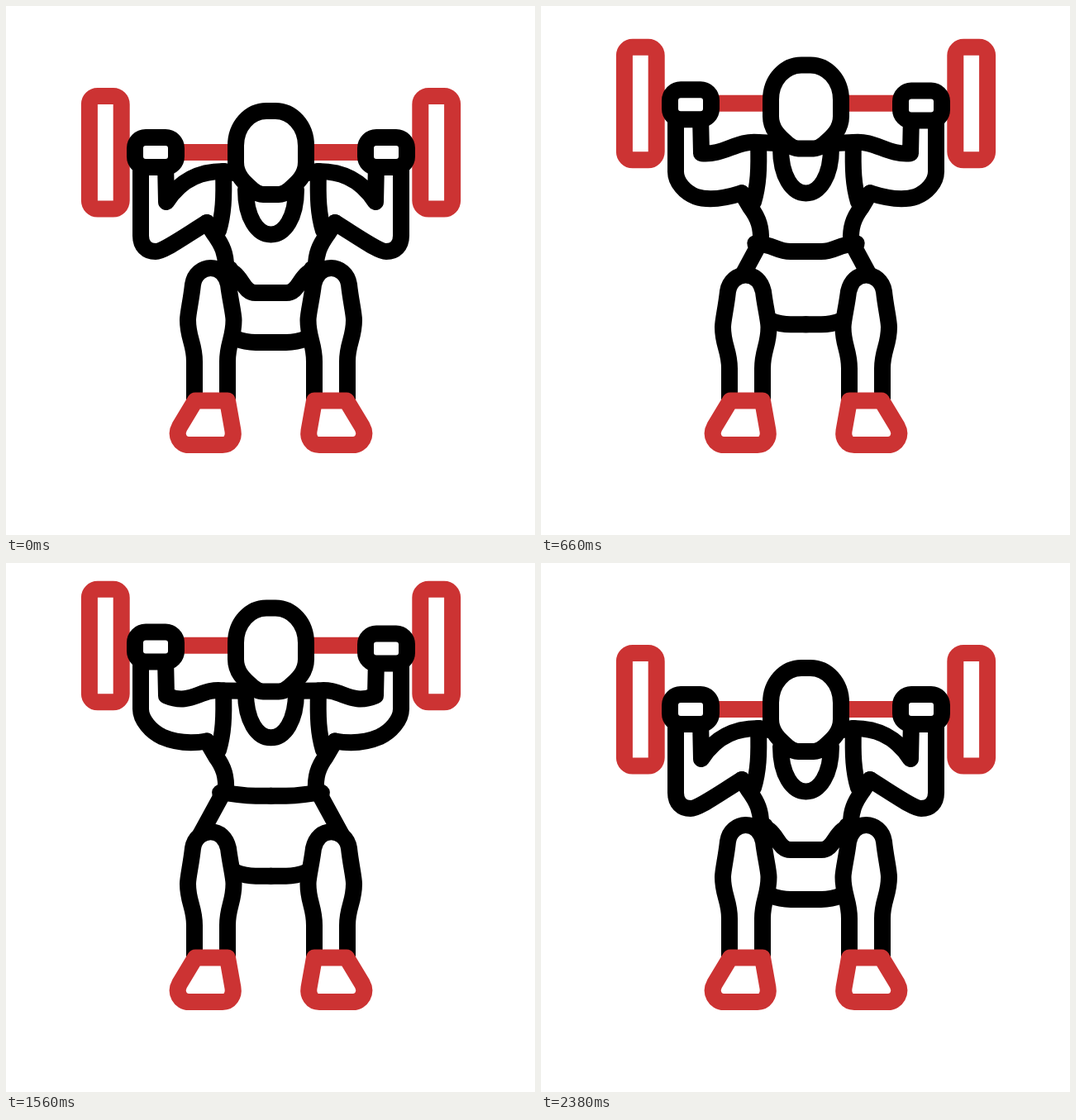
Recreate the animation shown at these times as an HTML page with a canvas. Size 640 by 640 pixels, loop 2400 ms.

```html
<!DOCTYPE html>
<html lang="en">
<head>
<meta charset="utf-8">
<title>Squat with barbell</title>
<style>
  html, body { margin: 0; height: 100%; overflow: hidden; background: #fff; }
  canvas { display: block; }
</style>
</head>
<body>
<canvas id="stage" width="640" height="640"></canvas>
<script>
const ctx = document.getElementById('stage').getContext('2d');
const BLACK = '#000', RED = '#cc3333';
const LOOP = 2400, HALF = 1194;

// Pairs of path data: squatting pose, standing pose. Left half only; the right half is mirrored.
const UPPER_ARM = ['M263 200C240 200 214 206 194 237L193 190', 'M263 150C235 146 225 170 194 153L193 108'];
const FOREARM = [
  'M163 190L163 278C163 290 170 297 181 297C190 297 208 284 243 262',
  'M163 108L163 167C163 180 176 195 190 202C203 208 222 213 243 211'];
const ARMHOLE = ['M263 201C264 232 263 252 257 272', 'M263 151C264 182 263 202 257 222'];
const SHOULDER = ['M263 200L291 204', 'M263 150L291 150'];
const FLANK = ['M243 262L252 276C262 290 266 300 266 315', 'M243 211L254 230C264 243 267 255 266 272'];
const WAIST = ['M260 318C286 318 284 347 302 347L321 347', 'M259 274C280 275.5 285 275.5 302 275.5L321 275.5'];
const HIP = ['M270 318L271 318', 'M261 276L232 329'];
const HEM = ['M277 402Q290 407 302 407L321 407', 'M277 371Q290 376 302 376L321 376'];
const LEG = [
  'M228 476L228 430C228 408 220 402 220 380C220 372 224 356 226 337C228 324 238 317 247.5 317C258 317 266 324 269 337C271 354 275.5 372 275.5 380C275.5 402 268 408 268 430L268 476',
  'M228 476L228 441C228 419 220 413 220 391C220 383 224 367 226 348C228 335 238 328 247.5 328C258 328 266 335 269 348C271 365 275.5 383 275.5 391C275.5 413 268 419 268 441L268 476'];
const FOOT = 'M229 477.5L210 509C204 520 211 531 221 531H262C271 531 276 523 274.5 514L268 477.5Z';
const COLLAR = 'M290 222C290 256 304 276.5 320.5 276.5C337 276.5 351 256 351 222';
const HEAD = 'M278 169C278 145 295 127 315 127H326C346 127 363 145 363 169V189C363 206 351 215 342 223Q336 228 330 228H311Q305 228 299 223C290 215 278 206 278 189Z';

function tween([from, to], k) {
  const ends = to.match(/[\d.]+/g);
  let i = 0;
  return from.replace(/[\d.]+/g, n => +n + (ends[i++] - n) * k);
}

// Symmetric ease: cubic-bezier(a, 0, 1 - a, 1)
function ease(x, a = 0.77) {
  let lo = 0, hi = 1;
  for (let i = 0; i < 24; i++) {
    const s = (lo + hi) / 2, r = 1 - s;
    if (3 * a * s * r * r + 3 * (1 - a) * s * s * r + s ** 3 < x) lo = s; else hi = s;
  }
  return lo * lo * (3 - 2 * lo);
}

const clamp = x => Math.min(1, Math.max(0, x));
const smooth = x => x * x * (3 - 2 * x);

function draw(path, { color = BLACK, fill = false, dy = 0 } = {}) {
  const shape = typeof path === 'string' ? new Path2D(path) : path;
  ctx.save();
  ctx.translate(0, dy);
  ctx.strokeStyle = color;
  if (fill) ctx.fill(shape);
  ctx.stroke(shape);
  ctx.restore();
}

function box(x, y, w, h, r) {
  const shape = new Path2D();
  shape.roundRect(x, y, w, h, r);
  return shape;
}

function bothSides(drawSide) {
  drawSide(false);
  ctx.save();
  ctx.translate(641, 0);
  ctx.scale(-1, 1);
  drawSide(true);
  ctx.restore();
}

function render(t) {
  const rise = ease(clamp(t < HALF ? t / HALF : 2 - t / HALF));
  const knee = smooth(clamp(t < HALF ? t / 960 : 1 - (t - HALF) / 1100));
  const barY = -84.7 * rise;

  ctx.fillStyle = '#fff';
  ctx.fillRect(0, 0, 640, 640);
  ctx.lineWidth = 20;
  ctx.lineJoin = 'round';

  ctx.lineCap = 'butt';
  draw('M146 177H495', { color: RED, dy: barY });

  ctx.lineCap = 'round';
  bothSides(() => {
    draw(box(100.9, 109, 38.8, 136.5, 10), { color: RED, dy: barY });
    for (const part of [UPPER_ARM, FOREARM, ARMHOLE, SHOULDER, FLANK, WAIST, HIP, HEM]) {
      draw(tween(part, rise));
    }
  });
  draw(COLLAR, { dy: -71.5 * rise });
  draw(HEAD, { fill: true, dy: -79.5 * rise });

  bothSides(right => {
    ctx.lineCap = 'butt';
    draw(tween(LEG, knee), { fill: true });
    draw(FOOT, { color: RED, fill: true });
    draw(box(156, 159, 50, 36, 13), { fill: true, dy: (right ? -80.7 : -82.7) * rise });
  });
}

function tick() {
  render(performance.now() % LOOP);
  requestAnimationFrame(tick);
}
tick();
</script>
</body>
</html>
```
